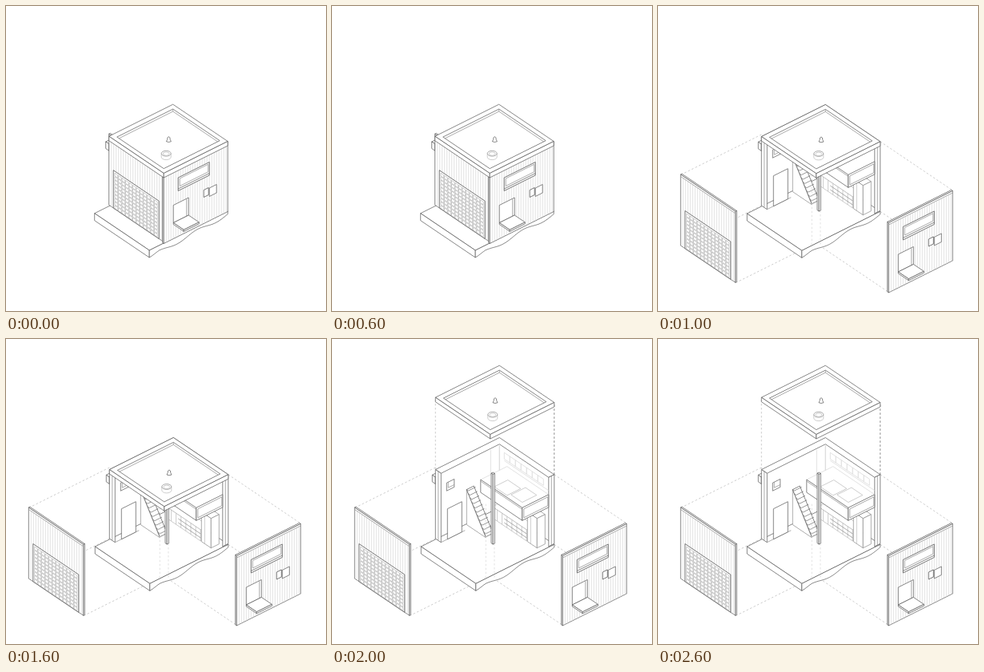
Write an HTML page with a canvas that moves like this. It is 400x382 px and loops after 3 s.

```html
<!DOCTYPE html>
<html lang="en">
<head>
<meta charset="utf-8">
<title>Exploded house</title>
<style>
html, body { margin: 0; width: 100%; height: 100%; overflow: hidden; background: #fff; }
canvas { display: block; width: 400px; height: 382px; }
</style>
</head>
<body>
<canvas id="stage" width="400" height="382"></canvas>
<script>
const ctx = document.getElementById('stage').getContext('2d');
const DARK = '#555', MID = '#888', PALE = '#b8b8b8', FAINT = '#d6d6d6';

// House axes: u runs along the garage wall, v along the window wall, h is up.
const U = 68.5, V = 80, H = 86.5;
const WALL = 7, ROOF = 5.5, RIM = 5;
const LIFT = 90.3, GARAGE_OUT = -101, WINDOW_OUT = 90.5;

const project = ([u, v, h]) => [129.3 + u + v, 250 + 0.676 * u - 0.5 * v - h];

function trace(points, closed) {
  ctx.beginPath();
  for (const p of points) ctx.lineTo(...project(p));
  if (closed) ctx.closePath();
}

function stroke(color, width = 0.7) {
  ctx.strokeStyle = color;
  ctx.lineWidth = width;
  ctx.stroke();
}

function line(points, color = DARK, width) {
  trace(points);
  stroke(color, width);
}

function shape(points, color = DARK, width, fill = '#fff') {
  trace(points, true);
  ctx.fillStyle = fill;
  ctx.fill();
  stroke(color, width);
}

function guide(from, to, color = PALE) {
  ctx.setLineDash([2.5, 2.5]);
  line([from, to], color);
  ctx.setLineDash([]);
}

// Rectangles lying in the three principal planes.
const alongU = (v, u, h, du, dh, ...style) =>
  shape([[u, v, h], [u + du, v, h], [u + du, v, h + dh], [u, v, h + dh]], ...style);
const alongV = (u, v, h, dv, dh, ...style) =>
  shape([[u, v, h], [u, v + dv, h], [u, v + dv, h + dh], [u, v, h + dh]], ...style);
const flat = (h, u, v, du, dv, ...style) =>
  shape([[u, v, h], [u + du, v, h], [u + du, v + dv, h], [u, v + dv, h]], ...style);

function cuboid(u, v, h, du, dv, dh, ...style) {
  flat(h + dh, u, v, du, dv, ...style);
  alongU(v, u, h, du, dh, ...style);
  alongV(u + du, v, h, dv, dh, ...style);
}

function moved(u, v, h, draw) {
  const [x0, y0] = project([0, 0, 0]), [x, y] = project([u, v, h]);
  ctx.save();
  ctx.translate(x - x0, y - y0);
  draw();
  ctx.restore();
}

function ellipse(x, y, rx, ry, color, fill) {
  ctx.beginPath();
  ctx.ellipse(x, y, rx, ry, 0, 0, Math.PI * 2);
  if (fill) { ctx.fillStyle = fill; ctx.fill(); }
  stroke(color);
}

function garageWall() {
  const top = 89.5, cols = 12, rows = 10, w = 54 / cols, h = 45 / rows;
  cuboid(0, 0, 0.5, U, 1.6, top - 0.5);
  for (let u = 3; u < U; u += 3) line([[u, 0, 1], [u, 0, top - 3]], FAINT);
  line([[0, 0, top - 2.5], [U, 0, top - 2.5]], MID);
  alongU(0, 5.5, 0.5, 57, 47.2, DARK, 0.8);
  for (let r = 0; r < rows; r++)
    for (let c = 0; c < cols; c++)
      alongU(0, 7.3 + c * w, 1.2 + r * h, w - 0.8, h - 0.8, '#a2a2a2', 0.55);
}

function windowWall() {
  const base = -1.5, top = H - 0.5;
  cuboid(U - 1.6, 0, base, 1.6, V, top - base);
  for (let v = 3; v < V; v += 3) line([[U, v, base], [U, v, top - 3]], FAINT);
  line([[U, 0, top - 2.5], [U, V, top - 2.5]], MID);

  alongV(U, 18, 55.5, 39, 16.5, DARK, 0.8);
  alongV(U, 20, 60.5, 35.5, 9.5, MID);
  line([[U, 18, 58], [U, 57, 58]]);

  alongV(U, 50, 31.5, 6, 9, DARK, 0.8);
  alongV(U, 57, 29, 9, 10.5);

  alongV(U, 12, 18.5, 19, 22);
  line([[U, 28.5, 18.5], [U, 28.5, 40]], MID);
  cuboid(U, 12, 16.5, 13, 19, 2);
}

function vent() {
  const x = 204, y = 170;
  ctx.beginPath();
  ctx.moveTo(x - 3, y);
  ctx.quadraticCurveTo(x - 1.5, y - 2, x - 1.4, y - 5);
  ctx.quadraticCurveTo(x, y - 7, x + 1.4, y - 5);
  ctx.quadraticCurveTo(x + 1.5, y - 2, x + 3, y);
  ctx.quadraticCurveTo(x, y + 1.6, x - 3, y);
  stroke(DARK);
}

function pipe() {
  const x = 200.8, y = 185, r = 6, drop = 4.5;
  ctx.beginPath();
  ctx.moveTo(x - r, y);
  ctx.lineTo(x - r, y + drop);
  ctx.ellipse(x, y + drop, r, 3.4, 0, Math.PI, 0, true);
  ctx.lineTo(x + r, y);
  stroke(PALE);
  ellipse(x, y, r, 3.4, MID, '#fff');
  ellipse(x, y + 0.4, r - 2, 2.2, PALE);
}

function roof() {
  cuboid(0, 0, H - ROOF, U, V, ROOF);
  flat(H, RIM, RIM, U - 2 * RIM, V - 2 * RIM);
  ctx.save();
  ctx.clip();
  const floor = H - 3;
  line([[RIM, RIM, floor], [RIM, V - RIM, floor], [U - RIM, V - RIM, floor]], MID);
  line([[RIM, V - RIM, floor], [RIM, V - RIM, H]], MID);
  ctx.restore();
  vent();
  pipe();
}

function slab() {
  const top = -1, depth = 9, v0 = -18, steps = 48;
  cuboid(-4, 0, 68.5, 4, 5, 8.5);
  flat(top, 0, v0, U, V - v0);
  alongU(v0, 0, top - depth, U, depth);
  const ground = [[U, v0, top], [U, V, top]];
  for (let i = steps; i >= 0; i--) {
    const t = i / steps;
    const cut = depth - 5 * t + 2.2 * Math.sin(4 * Math.PI * t - 2.95) * Math.min(1, 8 * t);
    ground.push([U, v0 + t * (V - v0), top - cut]);
  }
  shape(ground);
}

function kitchen() {
  const v = 63, u = 8, length = 43, height = 14;
  cuboid(u, v, 0, length, 10, height, PALE);
  for (let i = 1; i < 7; i++)
    line([[u + i * length / 7, v, 0], [u + i * length / 7, v, height]], PALE);
  for (const h of [4, 9]) line([[u + 15, v, h], [u + length, v, h]], MID);
  cuboid(52, v, 0, 12, 10, 37, MID);
  line([[56, v, 0], [56, v, 37]], PALE);
}

function stairs() {
  const v = 33, steps = 11, width = 9;
  const tread = i => [6 + 24 * i / steps, 49 - 43 * i / steps];
  shape([[6, v, 49], [6, v, 5], [30, v, 5]], MID);
  const [u0, h0] = tread(0), [u1, h1] = tread(steps);
  shape([[u0, v, h0], [u0, v + width, h0], [u1, v + width, h1], [u1, v, h1]]);
  for (let i = 0; i < steps; i++) {
    const [u, h] = tread(i), next = tread(i + 1)[0];
    line([[u, v, h], [next, v, h], [next, v + width, h]], DARK, 0.6);
  }
}

function loft(open) {
  const u = 16.5, v = 40, h = 49, du = U - u, dv = V - WALL - v, rail = 16;
  if (open) {
    flat(h + rail, u, v, du, dv, FAINT);
    flat(h + 8, u + 8, v + 9, 16, 17, PALE);
    flat(h + 11, u + 28, v + 10, 14, 18, PALE);
  }
  alongU(v, u, h, du, rail);
  alongV(U, v, h, dv, rail);
  line([[u, v, h + rail - 2], [U, v, h + rail - 2]], MID);
  alongV(U, v + 2, h + 2.5, dv - 3, rail - 5, MID);
}

function clerestory() {
  const v = V - WALL, panes = 7, w = 49 / panes;
  for (let i = 0; i < panes; i++) alongU(v, 13 + i * w, 72, w, 8, FAINT);
  for (const h of [70, 57]) line([[13, v, h], [U, v, h]], FAINT);
}

function shell() {
  const backU = U - WALL, inner = V - WALL;
  shape([[0, 0, H], [0, V, H], [U, V, H], [U, inner, H], [WALL, inner, H], [WALL, 0, H]]);
  alongU(0, 0, 0, WALL, H);
  alongV(U, inner, 0, WALL, H);
  line([[WALL / 2, 0, 0], [WALL / 2, 0, H]], MID);
  line([[U, inner + WALL / 2, 0], [U, inner + WALL / 2, H]], MID);
  line([[WALL, inner, 0], [WALL, inner, H]], FAINT);
  line([[WALL, 0, 0], [WALL, 30, 0]], MID);
}

function interior(open) {
  shell();
  if (open) {
    clerestory();
    for (const v of [62, 73]) line([[WALL, v, 50], [WALL, v, 88 - v / 20]], FAINT);
  }
  alongV(WALL, 7, 61, 9.5, 10);
  line([[WALL, 9, 71], [WALL, 9, 64], [WALL, 16.5, 64]], MID);
  alongV(WALL, 8, 0, 18, 38);
  kitchen();
  loft(open);
  stairs();

  const [u, v] = [36.4, 37.3];
  guide([24, 39, 40], [24, 39, -54], FAINT);
  guide([u, v, 0], [u, v, -44], FAINT);
  cuboid(u - 2, v - 2, 0, 2.2, 2.2, H + 1);
}

function closedHouse() {
  ctx.save();
  ctx.translate(-0.6, -0.3);
  slab();
  garageWall();
  windowWall();
  roof();
  ctx.restore();
}

function explodedHouse(roofLifted) {
  guide([0, 0, 89], [0, GARAGE_OUT, 89]);
  guide([U, 0, 0], [U, GARAGE_OUT, 0]);
  guide([U, V, H], [U + WINDOW_OUT, V, H]);
  guide([U, 0, -1], [U + WINDOW_OUT, 0, -1]);
  guide([U, V, -1], [U + WINDOW_OUT, V, -1]);
  slab();
  guide([0, 0, 0], [0, GARAGE_OUT, 0]);
  interior(roofLifted);
  if (roofLifted) {
    guide([0, 0, H], [0, 0, H + LIFT]);
    guide([U, V, H], [U, V, H + LIFT], DARK);
    moved(0, 0, LIFT, roof);
  } else {
    roof();
  }
  moved(0, GARAGE_OUT, 0, garageWall);
  moved(WINDOW_OUT, 0, 0, windowWall);
}

const start = performance.now();

function frame(now) {
  const stage = Math.floor((Math.max(0, now - start) % 3000) / 1000);
  ctx.fillStyle = '#fff';
  ctx.fillRect(0, 0, 400, 382);
  ctx.lineJoin = 'round';
  if (stage === 0) closedHouse();
  else explodedHouse(stage === 2);
  requestAnimationFrame(frame);
}

requestAnimationFrame(frame);
</script>
</body>
</html>
```
